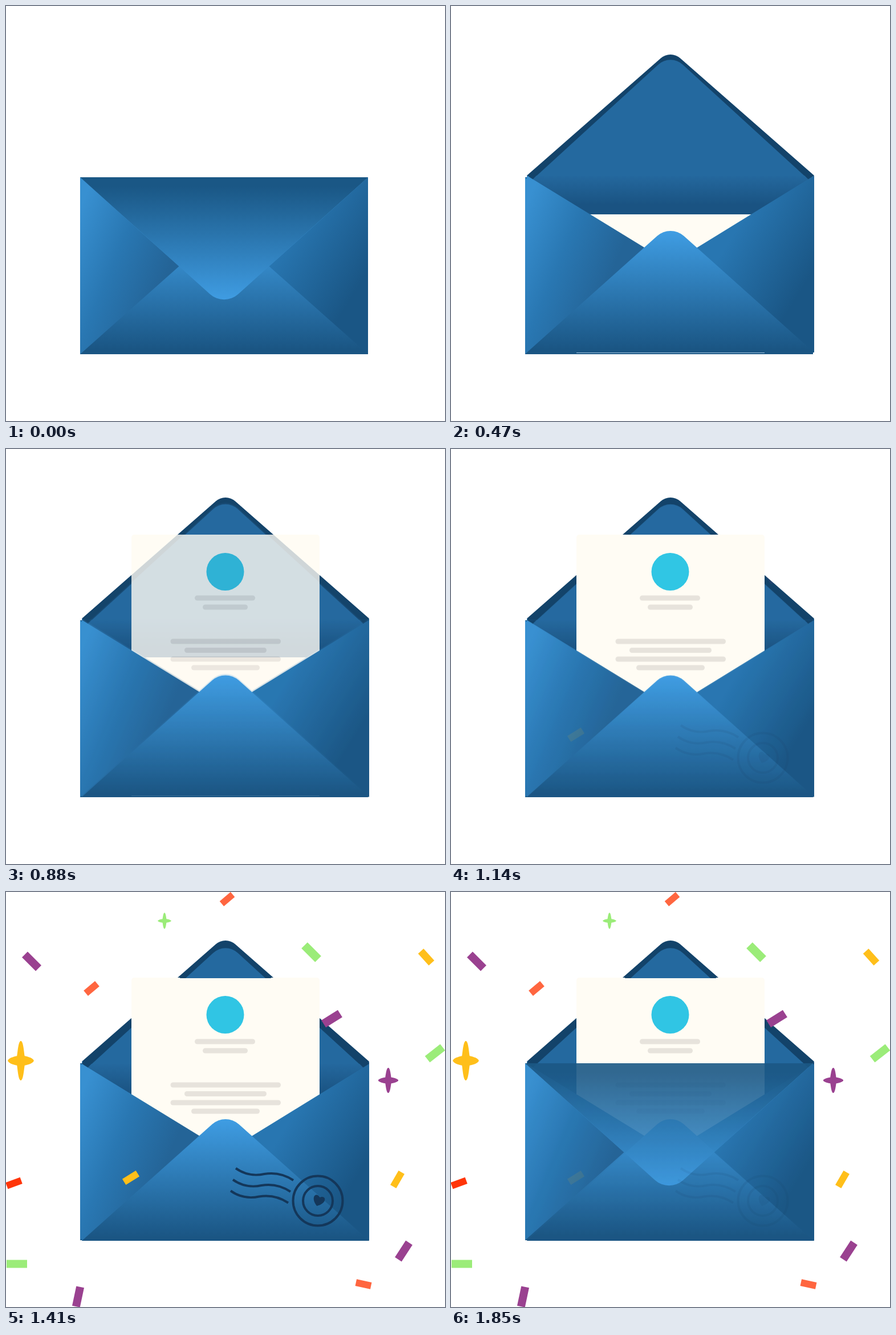
Recreate the animation shown at these times as an HTML page with a canvas. Size 770 by 727 pixels, loop 1880 ms.

```html
<!DOCTYPE html>
<html lang="en">
<head>
<meta charset="utf-8">
<title>Letter</title>
<style>
html, body { margin: 0; width: 100%; height: 100%; overflow: hidden; background: #fff; }
canvas { display: block; }
</style>
</head>
<body>
<canvas id="stage" width="770" height="727"></canvas>
<script>
const W = 770, H = 727, LOOP = 1880, STEP = 30;
const FADES = [200, 670, 1140, 1610];
const GREEN = '#9bec79', PURPLE = '#9a4190', GOLD = '#ffbf1a', CORAL = '#ff6640', RED = '#ff3508';

// centre x, centre y, length, width, degrees, colour
const STRIPS = [
  [388, 12.5, 25, 11.5, -40, CORAL], [150, 169, 26, 12, -40, CORAL], [627, 687, 27, 12, 12, CORAL],
  [45, 121.5, 34, 14, 45, PURPLE], [571.5, 222, 34, 15, -32, PURPLE],
  [697.5, 629, 35, 14, -57, PURPLE], [126.5, 709, 35, 14, -78, PURPLE],
  [535.5, 105.5, 34, 15, 45, GREEN], [752.5, 282.5, 34, 14, -38, GREEN], [19, 651.5, 36, 14, 0, GREEN],
  [737, 114, 28, 13, 48, GOLD], [219, 500.5, 28, 12, -32, GOLD], [686.5, 503.5, 29, 12, -60, GOLD],
  [14, 510, 27, 12, -20, RED]
];
const STARS = [[26, 295.5, 22.5, 34.5, GOLD], [278, 50.5, 11.5, 14, GREEN], [670.5, 330, 17.5, 22, PURPLE]];
// left, right, centre y
const LINES = [[331, 437, 261], [345, 424, 277], [288.5, 482, 337], [313, 457, 352.5], [288.5, 482, 368], [325, 445, 383]];

function scene(draw) {
  const canvas = document.createElement('canvas');
  canvas.width = W;
  canvas.height = H;
  draw(canvas.getContext('2d'));
  return canvas;
}

function gradient(c, x1, y1, x2, y2, ...colors) {
  const g = c.createLinearGradient(x1, y1, x2, y2);
  colors.forEach((color, i) => g.addColorStop(i / (colors.length - 1), color));
  return g;
}

function poly(c, fill, ...points) {
  c.beginPath();
  points.forEach(p => c.lineTo(...p));
  c.fillStyle = fill;
  c.fill();
}

// Triangle with a rounded apex; an optional base point closes it on the far side.
function wedge(c, fill, x1, x2, y, apex, r, base = y) {
  const mid = (x1 + x2) / 2;
  c.beginPath();
  c.moveTo(x1, y);
  c.arcTo(mid, apex, x2, y, r);
  c.lineTo(x2, y);
  c.lineTo(mid, base);
  c.fillStyle = fill;
  c.fill();
}

const leftShade = c => gradient(c, 140, 330, 310, 402, '#3890d1', '#2977b2', '#246497');
const rightShade = c => gradient(c, 470, 440, 600, 521, '#2876b1', '#1a5685');
const frontShade = c => gradient(c, 0, 394, 0, 602, '#3f9de3', '#1a5583');

function closedEnvelope(c) {
  c.fillStyle = frontShade(c);
  c.fillRect(130, 300, 505, 310);
  poly(c, leftShade(c), [130, 300], [303.5, 456], [130, 610]);
  poly(c, rightShade(c), [635, 300], [461.5, 456], [635, 610]);
  wedge(c, gradient(c, 0, 316, 0, 514, '#1a5785', '#3f9ce2'), 130, 635, 300, 527, 37);
}

function paper(c, top, shift) {
  c.fillStyle = '#fffcf4';
  c.beginPath();
  c.roundRect(220, top, 330, 590 - top, 5);
  c.fill();
  if (shift === undefined) return;
  c.fillStyle = '#30c5e4';
  c.beginPath();
  c.arc(384.5, 215, 33, 0, 7);
  c.fill();
  c.fillStyle = '#e7e3dc';
  for (const [x1, x2, y] of LINES) {
    c.beginPath();
    c.roundRect(x1, y - 4.5 + shift, x2 - x1, 9, 4.5);
    c.fill();
  }
}

function openEnvelope(c, dy, top, shift) {
  c.save();
  c.translate(0, dy);
  wedge(c, '#13436a', 133, 637, 297, 76.5, 26, 440);
  wedge(c, '#24699f', 143, 627, 304, 83, 32);
  poly(c, gradient(c, 0, 297, 0, 348, '#24689e', '#1a5382'), [135, 297], [635, 297], [627, 304], [550, 425], [220, 425], [143, 304]);
  poly(c, '#13436a', [133, 297], [150, 297], [143, 304]);
  poly(c, '#13436a', [637, 297], [620, 297], [627, 304]);
  c.restore();
  paper(c, top, shift);
  c.save();
  c.translate(0, dy);
  poly(c, leftShade(c), [133, 297], [339, 423], [385, 452], [133, 607]);
  poly(c, rightShade(c), [637, 297], [432, 423], [385, 452], [637, 607]);
  wedge(c, frontShade(c), 133, 637, 607, 382, 35);
  c.restore();
}

function postmark(c) {
  c.strokeStyle = c.fillStyle = '#14375a';
  c.lineWidth = 4;
  for (const r of [43.5, 26]) {
    c.beginPath();
    c.arc(547, 541, r, 0, 7);
    c.stroke();
  }
  for (const [x, y] of [[403, 484], [398, 504], [394, 523.5]]) {
    c.beginPath();
    c.moveTo(x, y);
    c.bezierCurveTo(x + 14, y + 10, x + 32, y + 14, x + 50, y + 10);
    c.bezierCurveTo(x + 68, y + 7, x + 86, y + 11, x + 101, y + 21);
    c.stroke();
  }
  c.save();
  c.translate(548.5, 540.5);
  c.rotate(0.33);
  c.beginPath();
  c.moveTo(0, 10);
  c.bezierCurveTo(-16, 0, -10, -14, 0, -6);
  c.bezierCurveTo(10, -14, 16, 0, 0, 10);
  c.fill();
  c.restore();
}

function confetti(c) {
  for (const [x, y, w, h, deg, color] of STRIPS) {
    c.save();
    c.translate(x, y);
    c.rotate(deg * Math.PI / 180);
    c.fillStyle = color;
    c.fillRect(-w / 2, -h / 2, w, h);
    c.restore();
  }
  for (const [x, y, rx, ry, color] of STARS) {
    c.fillStyle = color;
    for (const sx of [-1, 1]) for (const sy of [-1, 1]) {
      c.save();
      c.translate(x, y);
      c.scale(sx * rx, sy * ry);
      c.beginPath();
      c.moveTo(-.03, -.03);
      c.lineTo(-.03, 1);
      c.lineTo(0, 1);
      c.bezierCurveTo(.2, 1, .25, .4, .3, .24);
      c.bezierCurveTo(.6, .2, 1, .12, 1, 0);
      c.lineTo(1, -.03);
      c.fill();
      c.restore();
    }
  }
}

const closed = scene(closedEnvelope);
const opened = scene(c => {
  openEnvelope(c, 0, 365);
  c.fillStyle = '#9cc1de';
  c.fillRect(220, 607, 330, 1);
});
const letter = scene(c => openEnvelope(c, 2.5, 150, 0));
const party = scene(c => {
  openEnvelope(c, 4, 151, 1);
  postmark(c);
  confetti(c);
});
const scenes = [opened, letter, party, closed];
const ctx = document.getElementById('stage').getContext('2d');

function layer(image, mode, alpha) {
  ctx.globalCompositeOperation = mode;
  ctx.globalAlpha = alpha;
  ctx.drawImage(image, 0, 0);
}

// Fades blend over what is painted already; bare areas fill in at once halfway.
function render(t) {
  ctx.clearRect(0, 0, W, H);
  layer(closed, 'source-over', 1);
  FADES.forEach((start, i) => {
    if (t < start) return;
    const p = Math.min(1, (Math.floor((t - start) / STEP) + 1) / 10);
    layer(scenes[i], 'source-atop', p);
    if (p >= .5) layer(scenes[i], 'destination-over', 1);
  });
}

const began = performance.now();
function tick() {
  render((performance.now() - began) % LOOP);
  requestAnimationFrame(tick);
}
tick();
</script>
</body>
</html>
```
